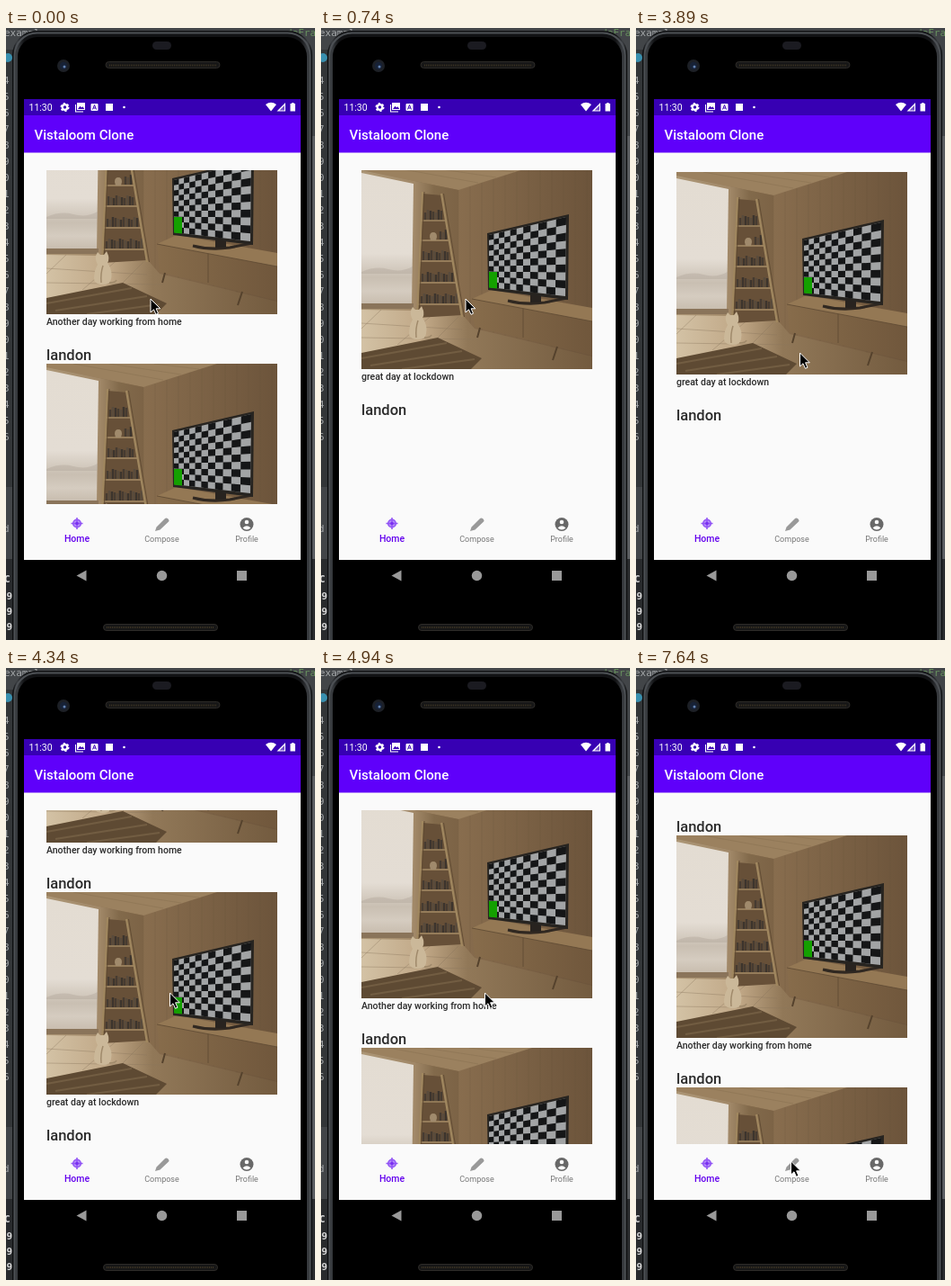
Animation, 344 px wide and 680 px high, one loop 8 s. Source, as an HTML page:

```html
<!DOCTYPE html>
<html lang="en">
<head>
<meta charset="utf-8">
<title>Feed scroll</title>
<style>
  html, body { margin: 0; width: 100%; height: 100%; overflow: hidden; background: #3c3f41; }
  svg { display: block; width: 344px; height: 680px; }
  text { font-family: Roboto, sans-serif; }
  .code { font: 11px "DejaVu Sans Mono", monospace; fill: #a4a7a9; }
  .log { font-weight: 700; fill: #d8d8d8; }
  .name { font-size: 16.5px; font-weight: 500; fill: #2a2a2a; }
  .caption { font-size: 10.5px; font-weight: 500; fill: #2a2a2a; }
  .tab { font-size: 9px; fill: #777; text-anchor: middle; }
  .tab.on { font-size: 10.5px; font-weight: 500; fill: #6200ee; }
</style>
</head>
<body>
<svg viewBox="0 0 344 680">
  <defs>
    <linearGradient id="wall">
      <stop offset="0" stop-color="#947b5b"/><stop offset=".42" stop-color="#886d4e"/><stop offset="1" stop-color="#6c543b"/>
    </linearGradient>
    <linearGradient id="sideWall">
      <stop offset="0" stop-color="#ac9676"/><stop offset=".55" stop-color="#a18868"/><stop offset=".75" stop-color="#826a4b"/><stop offset="1" stop-color="#7c6346"/>
    </linearGradient>
    <linearGradient id="sky" x2="0" y2="1">
      <stop offset="0" stop-color="#e3dcd2"/><stop offset=".6" stop-color="#e4ddd4"/>
      <stop offset=".78" stop-color="#c9bfb2"/><stop offset=".88" stop-color="#d5ccc0"/><stop offset="1" stop-color="#c5b9aa"/>
    </linearGradient>
    <linearGradient id="floor">
      <stop offset="0" stop-color="#d3c2a5"/><stop offset=".28" stop-color="#bfa685"/><stop offset=".46" stop-color="#917858"/><stop offset="1" stop-color="#735b3f"/>
    </linearGradient>
    <linearGradient id="cabinet">
      <stop offset="0" stop-color="#876c4b"/><stop offset="1" stop-color="#70573c"/>
    </linearGradient>
    <linearGradient id="rim">
      <stop offset="0" stop-color="#08090a"/><stop offset=".015" stop-color="#3b3e42"/><stop offset=".04" stop-color="#111214"/>
      <stop offset=".96" stop-color="#111214"/><stop offset=".985" stop-color="#3b3e42"/><stop offset="1" stop-color="#08090a"/>
    </linearGradient>
    <clipPath id="listClip"><path d="M40 158H308V529H40z"/></clipPath>
    <clipPath id="photoClip"><path d="M0 0H257V225H0z"/></clipPath>

    <g id="photo" clip-path="url(#photoClip)">
      <path d="M0 0H257V225H0z" fill="url(#wall)"/>
      <path id="planks" fill="none" stroke="#5f4d38" stroke-opacity=".2" stroke-width=".8"/>
      <path d="M0 0H190L108 26 0 4z" fill="#9b815f"/>
      <path d="M30 0L130 18M70 0L150 12M120 0L170 6" stroke="#7f6849" stroke-opacity=".45" stroke-width=".8"/>
      <path d="M0 4L108 26V166H0z" fill="url(#sideWall)"/>
      <path d="M0 7L58 19 56 156H0z" fill="url(#sky)"/>
      <path d="M0 117Q16 110 30 114T57 111V119H0z" fill="#a99f93" opacity=".35"/>
      <path d="M0 152H58V158H0z" fill="#8a745a"/>
      <path d="M0 159L61 160 113 165 126 180 257 211V225H0z" fill="url(#floor)"/>
      <path d="M0 174L112 181M0 190L130 192M22 159L0 180M82 162L40 198M108 167L85 190" stroke="#8b775c" stroke-opacity=".5" stroke-width=".8"/>
      <path d="M0 207L85 190 134 213 122 225H0z" fill="#5e4a33"/>
      <path d="M0 213L95 196M10 221L112 205M45 225L126 214" stroke="#7b6549" stroke-opacity=".7" stroke-width="2"/>
      <path d="M68 30L90 32 112 165 62 168z" fill="#675038"/>
      <g id="books"/>
      <path d="M68 28L62 169M89 30L112 167" stroke="#a0875f" stroke-width="2.2"/>
      <path d="M70 28L64 169M91.500 30L114.500 167" stroke="#5f4a32" stroke-width=".9"/>
      <path d="M76 78q0-5 4-5t4 5l-1 4h-6z" fill="#a08a6c"/>
      <path d="M55 160l2-4 3 3h4l3-4 2 5q1 5-1 8 6 8 4 18-1 6-9 6-9 0-10-6 0-10 4-16-3-5-2-10z" fill="#cbb899"/>
      <path d="M63 171q-3 9-2 19M70 190q7 0 8-3" fill="none" stroke="#a08a6b" stroke-width="1.5"/>
      <path d="M123 147L145 137 257 157V174z" fill="#947854"/>
      <path d="M123 147L257 172V210L126 178z" fill="url(#cabinet)"/>
      <path d="M180 158V190M123 147L257 172" fill="none" stroke="#5e4a33" stroke-width=".8"/>
      <path d="M132 179L129 190M218 200L213 215" stroke="#55422d" stroke-width="2"/>
      <path d="M163 149Q182 154 204 151L229 146" fill="none" stroke="#302821" stroke-width="3"/>
      <path d="M188 138H200V151H188z" fill="#28231f"/>
      <path d="M140 74L231 53 230 148 141 137z" fill="#272420"/>
      <path d="M142 76L228 56 227 144 142 134z" fill="#a2a4a5"/>
      <path id="checks" fill="#151617"/>
      <path d="M142 117H151V135.500L142 134.500z" fill="#14a000"/>
    </g>
  </defs>

  <!-- desktop behind the phone -->
  <path d="M0 0H344V680H0z" fill="#424548"/>
  <path d="M0 24H8V510H0z" fill="#333638"/>
  <path d="M336 120H344V590H336z" fill="#5a5d60"/>
  <path d="M0 590H344V680H0z" fill="#292b2d"/>
  <text class="code" x="-2" y="9">exampl</text>
  <text class="code" x="312" y="9" style="fill:#69935f">deFra</text>
  <circle cx="2" cy="33" r="5" fill="#398fae"/>
  <g id="gutter"></g>

  <!-- phone -->
  <rect x="7" y="3" width="334" height="720" rx="27" fill="url(#rim)"/>
  <rect x="9.500" y="5.500" width="329" height="715" rx="25" fill="none" stroke="#4c5054" stroke-width="2"/>
  <rect x="13" y="10" width="322" height="705" rx="22" fill="#000"/>
  <rect x="163" y="15" width="21" height="9" rx="4.500" fill="#1b1b21"/>
  <circle cx="64" cy="42" r="7" fill="#1d2026"/><circle cx="64" cy="42" r="4.200" fill="#172237"/>
  <circle cx="65" cy="43" r="1.500" fill="#6383b4"/>
  <g fill="#171717" stroke="#2d2b28">
    <rect x="111" y="37.500" width="127" height="7" rx="3.500"/><rect x="108.500" y="662.500" width="127" height="7" rx="3.500"/>
  </g>
  <path d="M115 41.500H234M112 666H232" stroke="#3b3323" stroke-width="2" stroke-dasharray="1 1"/>

  <path d="M20 79H328V591H20z" fill="#fafafa"/>
  <path d="M20 79H328V97H20z" fill="#3700b3"/>
  <path d="M20 97H328V138.500H20z" fill="#5f00fa"/>
  <text x="25.500" y="92" font-size="10.500" fill="#fff">11:30</text>
  <g fill="#fff">
    <circle cx="65.500" cy="88" r="2.800" fill="none" stroke="#fff" stroke-width="2.200"/>
    <circle cx="65.500" cy="88" r="4.300" fill="none" stroke="#fff" stroke-width="1.500" stroke-dasharray="2.200 2.300"/>
    <path d="M79 83H88V91H79zM77 85H78V92.500H86V93.500H77z"/>
    <path d="M80 90L82.500 86.800 84 88.500 85.300 87.200 87.300 90z" fill="#3700b3"/>
    <rect x="94.500" y="84" width="8" height="8" rx="1"/>
    <path d="M96.500 90.500L98.500 85.500 100.500 90.500M97.300 89H99.700" fill="none" stroke="#3700b3"/>
    <rect x="111" y="84" width="8" height="8"/>
    <circle cx="131.500" cy="88" r="1.300"/>
    <path d="M289 85Q295 80.500 301 85L295 92.500zM311 83V92.500H301.500zM316.500 84H318V83H320.500V84H322V92.500H316.500z"/>
  </g>
  <path d="M304.500 91.500H310V86z" fill="#3700b3" opacity=".7"/>
  <text x="31.500" y="123.500" font-size="15" font-weight="500" fill="#fff">Vistaloom Clone</text>

  <g clip-path="url(#listClip)"><g id="feed"></g></g>

  <!-- bottom tabs -->
  <g fill="none" stroke="#9154f5" stroke-width="1.500">
    <circle cx="79" cy="550.500" r="4.300" fill="#b58af8"/>
    <path d="M79 544V557M72.500 550.500H85.500"/>
  </g>
  <circle cx="79" cy="550.500" r="1.800" fill="#7a2ff1"/>
  <path d="M166 559L167.500 554.500 176.500 545.500Q178.500 543.500 180.500 545.500T180.500 549L171.500 557.500z" fill="#999"/>
  <circle cx="268" cy="551.500" r="7.500" fill="#686868"/>
  <circle cx="268" cy="549" r="2.300" fill="#fafafa"/>
  <path d="M263.500 555.500Q268 551 272.500 555.500 268 559.500 263.500 555.500z" fill="#fafafa"/>
  <text class="tab on" x="79" y="571">Home</text>
  <text class="tab" x="173.500" y="571">Compose</text>
  <text class="tab" x="268" y="571">Profile</text>

  <g fill="#999">
    <path d="M78.500 608.500L89.500 602.500V614.500z"/><circle cx="173.500" cy="608.500" r="5.700"/><path d="M257 603H268V614H257z"/>
  </g>

  <path id="cursor" d="M0 0V15L3.500 11.800 6 17.300 8.500 16.200 6.100 10.800H10.800z" fill="#000" stroke="#fff" stroke-width="1"/>
</svg>
<script>
const $ = id => document.getElementById(id);
const lerp = (a, b, k) => a + (b - a) * k;

// Checkerboard on the slanted screen; its left edge is farther away by DEPTH
const COLS = 11, ROWS = 10, DEPTH = 1.5;
const corner = (i, j) => {
  const c = i / COLS, u = c / lerp(DEPTH, 1, c), v = j / ROWS;
  return [lerp(142, lerp(228, 227, v), u), lerp(lerp(76, 56, u), lerp(134, 144, u), v)].map(n => n.toFixed(1));
};
let checks = '';
for (let i = 0; i < COLS; i++)
  for (let j = i % 2; j < ROWS; j += 2)
    checks += `M${corner(i, j)}L${corner(i + 1, j)} ${corner(i + 1, j + 1)} ${corner(i, j + 1)}z`;
$('checks').setAttribute('d', checks);

let planks = '';
for (let x = 108; x < 257; x += 13) planks += `M${x} 0V210`;
$('planks').setAttribute('d', planks);

// Ladder shelf: each board with a row of books on it
$('books').innerHTML = [60, 82, 105, 129, 153].map((y, row) => {
  const left = 68 - (y - 30) * 0.043, right = 89 + (y - 30) * 0.17;
  let books = '';
  for (let x = left + 3, n = 0; x < right - 4; x += 3, n++)
    if (row !== 1 || n > 5) {
      const h = 9 + (n * 7 + row * 3) % 4;
      books += `<path d="M${x} ${y - h}h2.500v${h}h-2.500z" fill="${['#463b31', '#594b3c', '#3c342d'][n % 3]}"/>`;
    }
  return books + `<path d="M${left} ${y}H${right}" stroke="#957c5a" stroke-width="1.800"/>`;
}).join('');

// Editor text peeking out beside the phone
const code = (label, x, y, kind = '') => `<text class="code ${kind}" x="${x}" y="${y}">${label}</text>`;
let lines = '';
for (let i = 0; i < 23; i++) lines += code((i + 4) % 10, -3, 62 + i * 18);
lines += code('d', -3, 560) + code('C', -2, 616, 'log');
for (let i = 0; i < 3; i++) lines += code('89', -6, 635 + i * 17, 'log');
$('gutter').innerHTML = lines;

// The third picture has not loaded yet
const PITCH = 280, PHOTO_TOP = 186;
$('feed').innerHTML = ['Another day working from home', 'great day at lockdown', ''].map((caption, i) =>
  `<g transform="translate(45 ${PHOTO_TOP + i * PITCH})"><text class="name" y="-4.500">landon</text>` +
  (caption && `<use href="#photo"/><text class="caption" y="236.500">${caption}</text>`) + '</g>').join('');

// Start time, scroll offset, cursor x, cursor y
const LOOP = 8000;
const poses = [
  [0, 93, 161, 301], [150, 151, 161, 301], [300, 218, 161, 301], [450, 270, 161, 301],
  [590, 301, 161, 301], [740, 312, 161, 301],
  [3290, 312, 161, 304], [3440, 312, 164, 313], [3590, 312, 171, 333], [3740, 312, 179, 353],
  [3890, 306, 182.5, 361], [4040, 272, 182.5, 361], [4190, 238, 182.5, 361],
  [4340, 217, 182.5, 361], [4490, 156, 182.5, 361], [4640, 105, 182.5, 361], [4790, 68, 182.5, 361],
  [4940, 44, 182.5, 361], [5090, 34, 182.5, 361],
  [5840, 9.5, 153.5, 467], [5990, 2, 154, 475], [6140, 0, 159, 500], [6290, 0, 168, 530],
  [6440, 0, 172, 543], [7490, 0, 172, 546], [7640, 0, 172.5, 548]
];

function draw() {
  const t = performance.now() % LOOP;
  const [, scroll, x, y] = poses.findLast(pose => pose[0] <= t);
  $('feed').setAttribute('transform', `translate(0 ${-scroll})`);
  $('cursor').setAttribute('transform', `translate(${x} ${y})`);
  requestAnimationFrame(draw);
}
draw();
</script>
</body>
</html>
```
